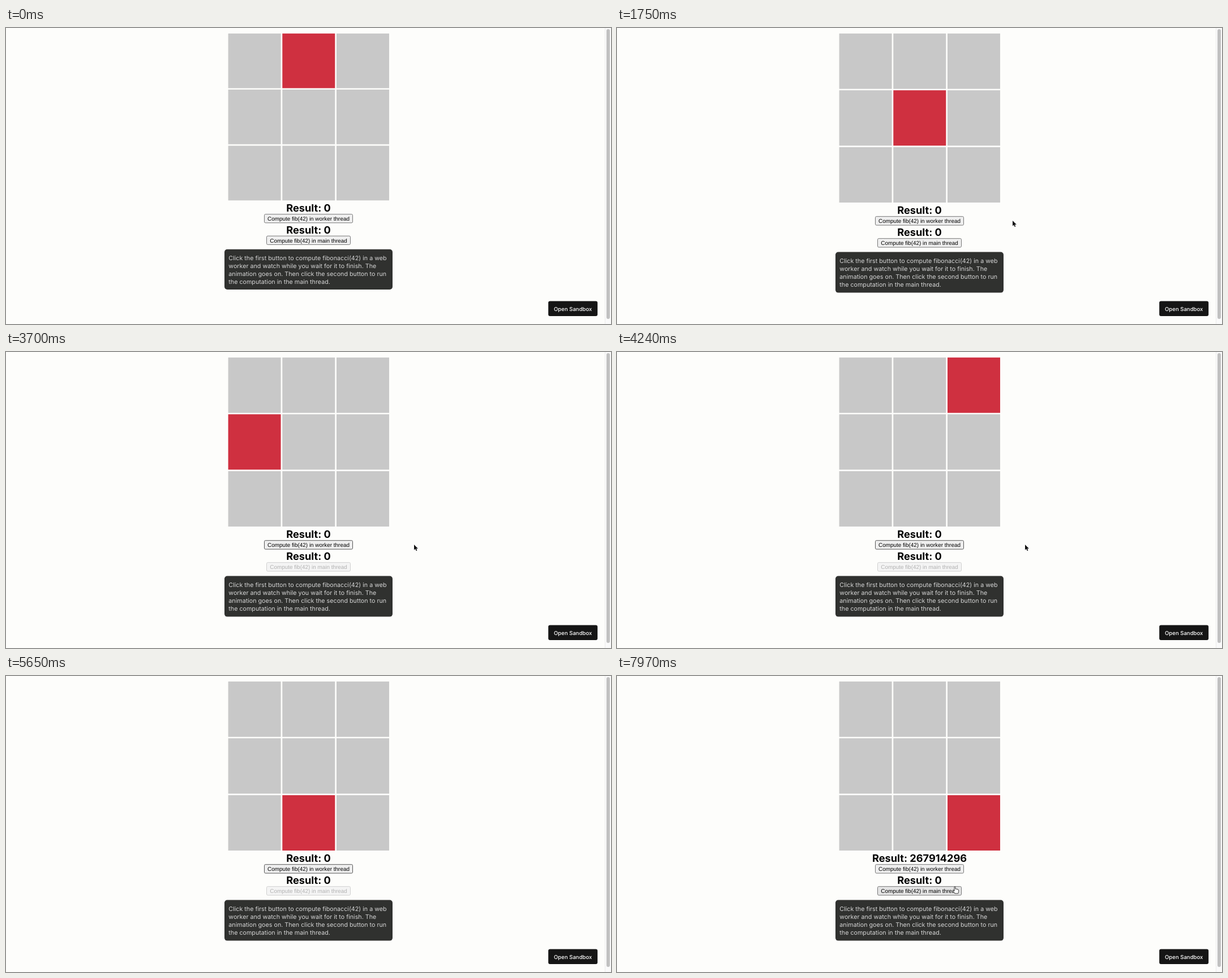
An HTML page with a canvas that plays this animation: 1069 by 524 pixels, repeating every 8000 ms.

```html
<!DOCTYPE html>
<html lang="en">
<head>
<meta charset="utf-8">
<title>Worker thread demo</title>
<style>
  html, body { margin: 0; width: 100%; height: 100%; overflow: hidden; background: #fdfdfb; }
  canvas { display: block; }
</style>
</head>
<body>
<canvas id="stage" width="1069" height="524"></canvas>
<script>
const ctx = document.getElementById('stage').getContext('2d');
const LOOP = 8000;
const UI_FONT = 'Inter, sans-serif';
const BUTTON_FONT = '"Liberation Sans", Arial, sans-serif';

// The red cell jumps once a second.
const RED_CELLS = [1, 8, 4, 3, 2, 7, 8, 6, 8];
const FIRST_JUMP = 730;
const PRESS = 2780, START = 2900, DONE = 7100;

// Pointer stops: time, x, y. It waits outside the right edge between visits.
const POINTER = [
  [0, 1072, 430], [250, 1072, 430], [700, 699, 341], [1750, 699, 341], [2300, 534, 341],
  [2950, 534, 341], [3450, 721, 341], [5050, 721, 341], [5500, 1072, 430],
  [7380, 1072, 430], [7850, 597, 373], [LOOP, 597, 373]
];
const WORKER_BUTTON = { x: 456.5, y: 333.7, w: 156, h: 15.4, label: 'Compute fib(42) in worker thread' };
const MAIN_BUTTON = { x: 460.5, y: 372.7, w: 148, h: 15.4, label: 'Compute fib(42) in main thread' };
const HELP = [
  'Click the first button to compute fibonacci(42) in a web',
  'worker and watch while you wait for it to finish. The',
  'animation goes on. Then click the second button to run',
  'the computation in the main thread.'
];
const ARROW = new Path2D('M0 0V9.6L2.2 7.6L3.7 11L5.4 10.3L3.9 7H6.9Z');
const HAND = new Path2D('M-1 1C-1 -.5 1 -.5 1 1V4.3C1.6 3.5 2.9 3.7 3 4.6C3.8 4 4.8 4.3 5 5.2' +
  'C5.9 4.8 6.7 5.3 6.7 6.3V8.6C6.7 10 5.9 10.7 5.7 12H-.2C-.6 10.6 -2.2 9.5 -3.2 7.8' +
  'C-4 6.5 -2.5 5.8 -1.7 6.9L-1 7.6Z');

const smooth = p => {
  p = Math.min(1, Math.max(0, p));
  return p * p * (3 - 2 * p);
};

function pointerAt(t) {
  const next = POINTER.findIndex(stop => stop[0] > t);
  const [t0, x0, y0] = POINTER[next - 1], [t1, x1, y1] = POINTER[next];
  const p = smooth((t - t0) / (t1 - t0));
  return [x0 + (x1 - x0) * p, y0 + (y1 - y0) * p];
}

function rect(x, y, w, h, color, radius = 0, border) {
  ctx.beginPath();
  ctx.roundRect(x, y, w, h, radius);
  ctx.fillStyle = color;
  ctx.fill();
  if (border) {
    ctx.lineWidth = 1;
    ctx.strokeStyle = border;
    ctx.stroke();
  }
}

function text(str, x, y, font, color, align = 'center') {
  ctx.font = font;
  ctx.textAlign = align;
  ctx.fillStyle = color;
  ctx.fillText(str, x, y);
}

const isOver = (b, [x, y]) => x >= b.x && x <= b.x + b.w && y >= b.y - 1 && y <= b.y + b.h;

function button(b, { disabled, pressed, hovered, focused }) {
  const fill = disabled ? '#f4f4f4' : pressed ? '#f6f6f6' : hovered ? '#e4e4e4' : '#efefef';
  const border = disabled ? '#d0d0d0' : focused ? '#555' : '#767676';
  rect(b.x, b.y, b.w, b.h, fill, 2, border);
  text(b.label, b.x + b.w / 2, b.y + 11.5, '9.92px ' + BUTTON_FONT, disabled ? '#b2b2b2' : '#000');
}

function drawPage(t, pointer) {
  const red = RED_CELLS[Math.max(0, Math.ceil((t - FIRST_JUMP + 1) / 1000))];
  for (let i = 0; i < 9; i++) {
    rect(392.6 + (i % 3) * 95.7, 9.7 + Math.floor(i / 3) * 100.6, 93, 98,
      i === red ? '#cf3040' : '#c8c8c8');
  }
  const computing = t >= START && t < DONE;
  const heading = 'bold 18.2px ' + UI_FONT;
  text('Result: ' + (t < DONE ? 0 : 267914296), 534.5, 329.2, heading, '#000');
  button(WORKER_BUTTON, {
    pressed: t >= PRESS && t < START,
    hovered: isOver(WORKER_BUTTON, pointer),
    focused: computing
  });
  text('Result: 0', 534.5, 368.4, heading, '#000');
  button(MAIN_BUTTON, { disabled: computing, hovered: isOver(MAIN_BUTTON, pointer) });

  rect(386, 396.6, 297, 72, '#30312f', 5);
  HELP.forEach((line, i) =>
    text(line, 393.3, 416 + i * 14.1, '10.73px ' + UI_FONT, '#d6d6d6', 'left'));
}

function drawPointer(point, hand) {
  ctx.save();
  ctx.translate(...point);
  ctx.lineJoin = 'round';
  if (hand) {
    ctx.fillStyle = '#fff';
    ctx.fill(HAND);
    ctx.lineWidth = 0.9;
    ctx.strokeStyle = '#222';
    ctx.stroke(HAND);
  } else {
    ctx.lineWidth = 1.6;
    ctx.strokeStyle = '#fff';
    ctx.stroke(ARROW);
    ctx.fillStyle = '#111';
    ctx.fill(ARROW);
  }
  ctx.restore();
}

function draw(t) {
  const pointer = pointerAt(t);
  ctx.textRendering = 'geometricPrecision';
  rect(0, 0, 1069, 524, '#fdfdfb');

  // The page starts slightly shorter and settles to full height.
  ctx.save();
  ctx.translate(0, 9.6);
  ctx.scale(1, 0.9876 + 0.0124 * smooth((t - 30) / 400));
  ctx.translate(0, -9.6);
  drawPage(t, pointer);
  ctx.restore();

  rect(958.2, 483.5, 87, 26.6, '#151515', 3);
  text('Open Sandbox', 1001.7, 500.5, '500 9.6px ' + UI_FONT, '#fff');
  rect(1058, 0, 11, 524, '#fafafa');
  rect(1058, 0, 1, 524, '#ebebeb');
  rect(1061, 2, 6, 513, '#c1c1c1', 3);

  const overMain = isOver(MAIN_BUTTON, pointer) && (t < START || t >= DONE);
  drawPointer(pointer, isOver(WORKER_BUTTON, pointer) || overMain);
}

const began = performance.now();
function tick() {
  draw((performance.now() - began) % LOOP);
  requestAnimationFrame(tick);
}
tick();
</script>
</body>
</html>
```
